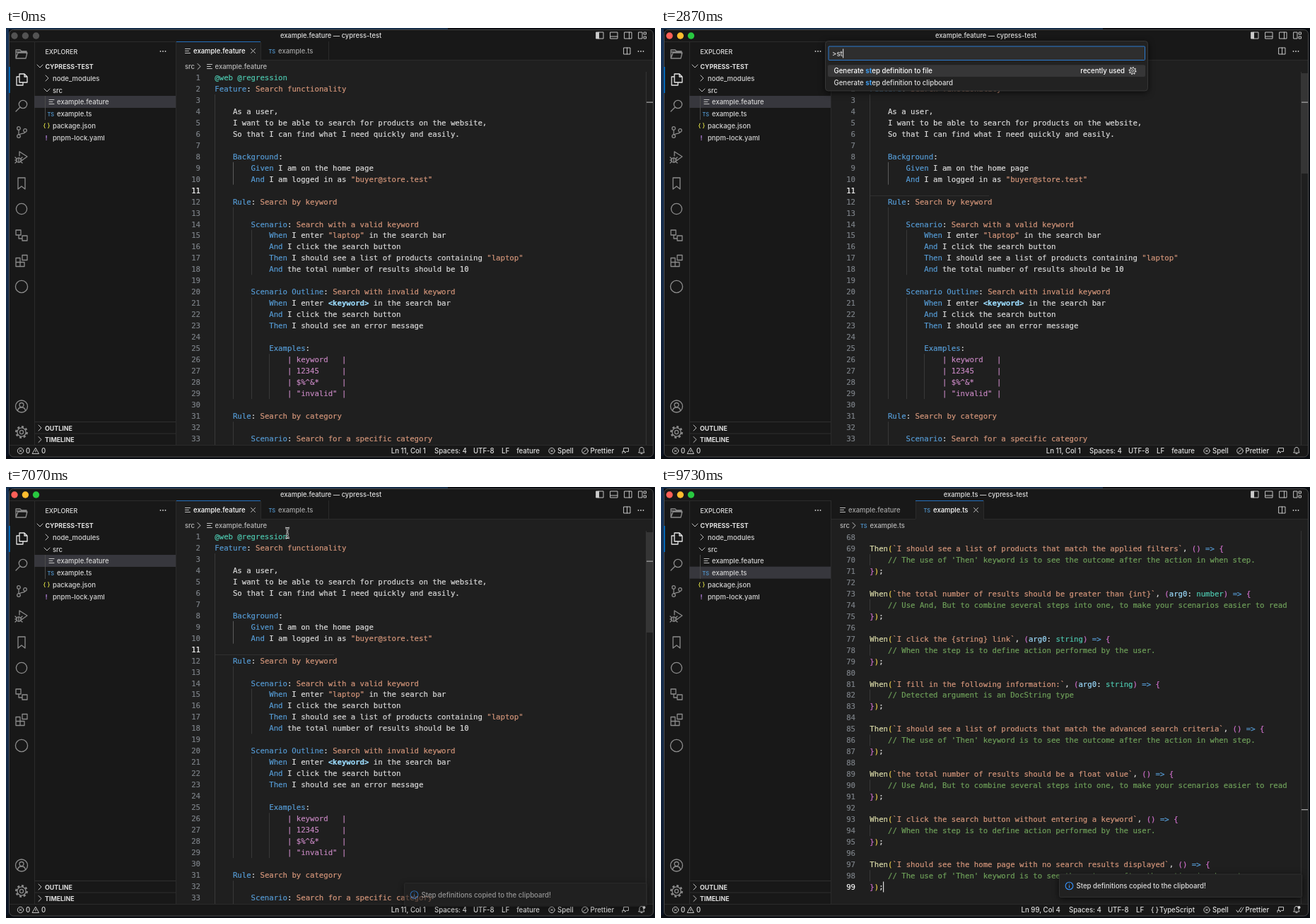
Recreate the animation shown at these times as an HTML page. Size 918x610 px, loop 9870 ms.

```html
<!DOCTYPE html>
<html lang="en">
<head>
<meta charset="utf-8">
<title>Step definitions</title>
<style>
html, body { margin: 0; width: 100%; height: 100%; overflow: hidden; background: #0a0d12; }
svg { display: block; width: 100vw; height: 100vh; }
text { font: 500 9.65px Inter, "Open Sans", sans-serif; color: #dedede; white-space: pre; }
text, tspan { fill: currentColor; }
.code { font: 10.66px "DejaVu Sans Mono", "Liberation Mono", monospace; color: #dcdcdc; }
.code, .code tspan { stroke: currentColor; stroke-width: .18; }
.num { color: #7d8288; text-anchor: end; }
.name { font-size: 9.5px; color: #d4d4d4; }
.title { font-size: 9.35px; text-anchor: middle; }
.plain { font-size: 8.9px; }
.head { font-size: 8.9px; font-weight: 700; }
.dim { color: #a4a4a4; }
.crumb { font-size: 9.5px; color: #b8b8b8; }
.lit { color: #fff; }
.hit { color: #3d9cf0; font-weight: 700; }
.end { text-anchor: end; }
.ts { color: #4e8fc4; font-size: 7.4px; font-weight: 600; }
.json { color: #cbcb41; font-size: 8.5px; font-weight: 600; }
.yaml { color: #a074c4; font-weight: 700; }
.key { font: bold 8.5px "DejaVu Sans", sans-serif; color: #eee; text-anchor: middle; }
.k { color: #569cd6; } .s { color: #d6977b; } .t { color: #4ec9b0; } .v { color: #9cdcfe; font-weight: 700; }
.p { color: #c586c0; } .c { color: #6fa05a; } .f { color: #dcdcaa; } .g { color: #f0d04a; }
.o { color: #d070cc; } .a { color: #9cdcfe; }
.ico { fill: none; stroke: #8c8c8c; stroke-width: 1.3; stroke-linejoin: round; stroke-linecap: round; }
.on { stroke: #e6e6e6; }
.small { stroke: #ccc; stroke-width: .95; }
.info { stroke: #3794ff; stroke-width: 1.1; }
.box { filter: drop-shadow(0 2px 5px #000a); }
</style>
</head>
<body>
<svg id="stage" viewBox="0 0 918 610" preserveAspectRatio="none" xml:space="preserve"></svg>
<script>
const LOOP = 9870, STEP = 70;
const LINE = 15.97, CHAR = 6.42, LEFT = 295.3, ROW = 16.72;
const FOCUS = 70, OPEN = 1610, TYPE = 2660, POINT = 5320, CLOSE = 6860, NOTE = 6945, SWITCH = 7910, PASTE = 9030;

const esc = s => s.replace(/&/g, '&amp;').replace(/</g, '&lt;');
const text = (x, y, s, cls = '', more = '') => `<text x="${x}" y="${y + 3.5}" class="${cls}" ${more}>${s}</text>`;
const rect = (x, y, w, h, fill, more = '') => `<rect x="${x}" y="${y}" width="${w}" height="${h}" fill="${fill}" ${more}/>`;
const path = (d, cls = '') => `<path d="${d}" class="ico ${cls}"/>`;
const ring = (x, y, r, cls = '') => `<circle cx="${x}" cy="${y}" r="${r}" class="ico ${cls}"/>`;
const group = (id, body, more = '') => `<g id="${id}" ${more}>${body}</g>`;
const at = (x, y, body) => `<g transform="translate(${x} ${y})">${body}</g>`;
const right = (x, y) => path(`M${x - 2} ${y - 4}l4 4l-4 4`, 'small');
const down = (x, y) => path(`M${x - 4} ${y - 2}l4 4l4 -4`, 'small');
const lines = (x, y) => path(`M${x - 3.5} ${y - 3}h7m-7 3h5m-5 3h7`, 'small');
const dots = (x, y) => [-3.5, 0, 3.5].map(d => `<circle cx="${x + d}" cy="${y}" r=".9" fill="#ccc"/>`).join('');
const gear = (x, y, r, cls = '') => ring(x, y, r * .72, cls) + ring(x, y, r * .3, cls) +
  `<circle cx="${x}" cy="${y}" r="${r * .9}" class="ico ${cls}" style="stroke-width:${r * .3};stroke-linecap:butt" pathLength="16" stroke-dasharray="1 1"/>`;

// Splits a line into coloured spans; the group name in the rule is the class.
function paint(line, rule) {
  let out = '', last = 0;
  for (const m of line.matchAll(rule)) {
    const cls = Object.keys(m.groups).find(k => m.groups[k] !== undefined);
    out += esc(line.slice(last, m.index)) + `<tspan class="${cls}">${esc(m[0])}</tspan>`;
    last = m.index + m[0].length;
  }
  return out + esc(line.slice(last));
}

function code(rows, first, y0, active, rule) {
  return rows.map((row, i) => {
    const y = y0 + i * LINE, n = first + i;
    return text(275, y + .4, n, 'code num' + (n === active ? ' lit' : '')) +
      (row ? text(LEFT, y + .4, paint(row, rule), 'code') : '');
  }).join('');
}

const guide = (col, from, to, y0 = 70, color = '#383838') =>
  rect(Math.round(LEFT + col * CHAR), y0 + (from - 1.5) * LINE, 1, (to - from + 1) * LINE, color);

const featureRule = /(?<t>^@.*)|(?<k>^\s*(?:Feature|Background|Rule|Scenario Outline|Scenario|Examples)(?=:)|^\s*(?:Given|When|Then|And)\b)|(?<p>\|.*)|(?<v><\w+>)|(?<s>"[^"]*"|(?<=: ).*)/g;
const feature = `@web @regression
Feature: Search functionality

    As a user,
    I want to be able to search for products on the website,
    So that I can find what I need quickly and easily.

    Background:
        Given I am on the home page
        And I am logged in as "buyer@store.test"

    Rule: Search by keyword

        Scenario: Search with a valid keyword
            When I enter "laptop" in the search bar
            And I click the search button
            Then I should see a list of products containing "laptop"
            And the total number of results should be 10

        Scenario Outline: Search with invalid keyword
            When I enter <keyword> in the search bar
            And I click the search button
            Then I should see an error message

            Examples:
                | keyword   |
                | 12345     |
                | $%^&*     |
                | "invalid" |

    Rule: Search by category

        Scenario: Search for a specific category`.split('\n');

const stepRule = /(?<c>\/\/.*)|(?<s>`[^`]*`)|(?<f>^\w+(?=\())|(?<g>(?<=^\w+)\(|(?<=^\})\))|(?<o>[(){}])|(?<k>=>)|(?<a>arg0)|(?<t>\b(?:number|string)\b)/g;
const notes = {
  then: "The use of 'Then' keyword is to see the outcome after the action in when step.",
  and: 'Use And, But to combine several steps into one, to make your scenarios easier to read',
  when: 'When the step is to define action performed by the user.',
  doc: 'Detected argument is an DocString type'
};
const steps = [
  ['then', 'I should see a list of products that match the applied filters'],
  ['and', 'the total number of results should be greater than {int}', 'number'],
  ['when', 'I click the {string} link', 'string'],
  ['doc', 'I fill in the following information:', 'string'],
  ['then', 'I should see a list of products that match the advanced search criteria'],
  ['and', 'the total number of results should be a float value'],
  ['when', 'I click the search button without entering a keyword'],
  ['then', 'I should see the home page with no search results displayed']
].flatMap(([kind, step, arg]) => ['',
  `${kind === 'then' ? 'Then' : 'When'}(\`${step}\`, (${arg ? 'arg0: ' + arg : ''}) => {`,
  '    // ' + notes[kind], '});']);

const commands = [
  ['Generate step definition to file'], ['Generate step definition to clipboard'],
  ['Developer: Reload Window'], ['Preferences: Open User Settings (JSON)'],
  ['Preferences: Open User Settings'], ['Format Document', '⇧⌘I'],
  ['View: Show Mordel Actions'], ['Transform to Uppercase'], ['Spell: Toggle Spell Checking'],
  ['Add Browser Breakpoint'], ['Add Cursor Above', '⌥⌘↑'], ['Add Cursor Below', '⌥⌘↓'],
  ['Add Cursors To Bottom'], ['Add Cursors to Line Ends', '⇧⌥I'], ['Add Cursors To Top']
].map(([name, keys = ''], i) => ({ name, keys, label: i < 9 ? 'recently used' : 'other commands' }));

const typed = [2660, 2870, 3360, 3500, 3640, 3920, 4270, 4480, 4620, 4900];
const QUERY = 'step defin';

function palette(query, hover) {
  const rule = new RegExp('\\b' + query, 'i');
  const rows = commands.filter(c => rule.test(c.name));
  const bottom = Math.min(295, 55.5 + rows.length * ROW);
  let out = rect(232.5, 18.5, 456, bottom - 18.5, '#222', 'rx="4" stroke="#363636" class="box"') +
    rect(237, 26, 447.5, 19.5, '#2e2e2e', 'stroke="#2a7ad0" rx="1"') +
    text(242, 36, '>' + query);
  rows.forEach((row, i) => {
    const y = 60.5 + i * ROW, hot = i === 0 || i === hover;
    const first = i === 0 || rows[i - 1].label !== row.label;
    if (hot) out += rect(236, y - 8.3, 449, ROW, i ? '#2b2b2c' : '#363637', 'rx="2"');
    if (first && i) out += rect(236, y - 8.3, 449, 1, '#3c3c3c');
    const name = query ? row.name.replace(rule, m => `<tspan class="hit">${m}</tspan>`) : row.name;
    out += text(244.5, y, name, i ? '' : 'lit');
    if (first) out += text(hot ? 656 : 674, y, row.label, 'end ' + (i ? 'dim' : 'lit'));
    if (hot) out += gear(667, y, 5.3, 'small');
    let x = hot ? 652.5 : 670.5;
    for (const key of [...row.keys].reverse()) {
      const w = key === 'I' ? 11 : /[↑↓]/.test(key) ? 15 : 16.5;
      out += rect(x - w, y - 7, w, 13.5, '#333', 'rx="2" stroke="#3f3f3f" stroke-width=".8"') +
        text(x - w / 2, y - .3, key, 'key');
      x -= w + 3;
    }
  });
  return out;
}

function frame() {
  const lights = [12, 27.4, 42.5].map(x => `<circle cx="${x}" cy="11" r="4.7"/>`).join('');
  const layout = [840, 860, 880, 900].map((x, i) => path(i === 3
    ? `M${x - 5} 6h5v9h-5zM${x + 2.5} 6h3v3h-3zm0 6h3v3h-3z`
    : `M${x - 5} 6h10v9h-10z` + ['m3.5 0v9', 'm0 6h10', 'm6.5 0v9'][i], 'small') +
    (i === 0 ? rect(x - 5, 6, 4, 9, '#ccc') : '')).join('');
  const icons = at(22, 37, path('M-8 6v-12h6l2 2h7v3M-8 6l3-8h13l-2 8zM-8-3h15')) +
    at(22, 73, path('M-3-8h7l4 4v8h-11zM4-8v4h4M-3-4h-4v12h9v-4', 'on')) +
    at(22, 110, ring(2, -2, 5.7) + path('M-2 2l-6 6')) +
    at(22, 147, ring(-4, -5, 2.3) + ring(-4, 6, 2.3) + ring(5, -2, 2.3) + path('M-4-2.7v6.4M5 .3c0 3-7 1-8 4')) +
    at(22, 183, path('M-3-2v-6l11 7l-7 5') + ring(-4, 4, 3.2) + path('M-4 1v6M-9 0l2 2M-9 4h2M-9 8l2-2M1 0l-2 2M1 4h-2M1 8l-2-2')) +
    at(22, 220, path('M-5-8h10v16l-5-4l-5 4z')) + ring(22, 256, 7.6) +
    at(22, 293, path('M-8-7h7v7h-7zM1 1h7v7h-7zM-4 0v5h5')) +
    at(22, 329.5, path('M-8-4h6v6h6v6h-12zM-8 2h6v6M1-8h7v7h-7z')) + ring(22, 366, 8.6) +
    at(22, 535.5, ring(0, 0, 8.5) + ring(0, -2, 3) + path('M-5.5 6c1-6 10-6 11 0')) + gear(22, 572, 8.5);
  const tree = text(55.5, 33, 'EXPLORER', 'plain') + dots(222, 33) +
    down(48, 54) + text(55.5, 54, 'CYPRESS-TEST', 'head') +
    right(58, 71) + text(66, 71, 'node_modules', 'name') + down(58, 88) + text(66, 88, 'src', 'name') +
    group('pick', rect(40, 96, 200, 17, '#37373d')) + rect(55, 96, 1, 34, '#4a4a4a') +
    lines(64.5, 104.5) + text(72, 104.5, 'example.feature', 'name') +
    text(58.5, 121, 'TS', 'ts') + text(72, 121.3, 'example.ts', 'name') +
    text(52.5, 137.5, '{ }', 'json') + text(66, 138, 'package.json', 'name') +
    text(55.5, 155, '!', 'yaml') + text(66, 155, 'pnpm-lock.yaml', 'name') +
    rect(40, 557, 200, 1, '#2f2f2f') + right(48, 566) + text(55, 566, 'OUTLINE', 'head') +
    rect(40, 573.5, 200, 1, '#2f2f2f') + right(48, 582.5) + text(55, 582.5, 'TIMELINE', 'head');
  const status = ring(20.5, 598.5, 4.2, 'small') + path('M19 597l3 3m0-3l-3 3', 'small') + text(28, 598.5, '0') +
    path('M42 594.5l4.5 8h-9zM42 597.5v2.5', 'small') + text(50, 598.5, '0') +
    ring(772, 598.5, 4.2, 'small') + path('M770.5 597l3 3m0-3l-3 3', 'small') + text(780, 598.5, 'Spell') +
    text(826.5, 598.5, 'Prettier') + path('M872 602v-3h2M874 594.5h6.5v5h-3l-2 2v-2h-1.5z', 'small') +
    path('M895 601h8l-1-2v-2.5c0-4-6-4-6 0v2.5zM898 602.5h2', 'small');
  const note = rect(563.5, 548, 343, 32.5, '#212121', 'rx="2" stroke="#303030" class="box"') +
    ring(577.5, 564.5, 5.3, 'info') + path('M577.5 564v3M577.5 561.7v.1', 'info') +
    text(587.5, 564.7, 'Step definitions copied to the clipboard!');
  const beam = 'M-3-7q3 0 3 2q0-2 3-2M0-5v10M-3 7q3 0 3-2q0 2 3 2M-2 2h4';
  const mouse = `<g id="beam" fill="none"><path d="${beam}" stroke="#eee" stroke-width="2.4"/><path d="${beam}" stroke="#111" stroke-width=".9"/></g>` +
    '<path id="hand" fill="#fff" stroke="#111" stroke-width=".9" d="M-2-5.5q1.2-1 2 .3v3l4.5 1q1.3.5 1 2.2l-1 4.5h-5.5l-3.8-5q0-1.4 1.3-1l1.5 1z"/>';

  return '<defs><linearGradient id="desk" x2="0" y2="1"><stop stop-color="#183357"/><stop offset=".6" stop-color="#152b49"/><stop offset="1" stop-color="#0a1220"/></linearGradient>' +
    '<clipPath id="clip"><rect x="241" y="62" width="674" height="528"/></clipPath>' +
    '<clipPath id="drop"><rect x="220" y="10" width="480" height="284.5"/></clipPath></defs>' +
    rect(0, 0, 918, 610, '#0a0d12') + rect(0, 0, 4, 606, 'url(#desk)') + rect(0, 0, 625, 2, '#152d48') +
    rect(4.5, 2.5, 911, 604.5, '#181818', 'rx="6" stroke="#484848"') +
    rect(5, 19, 910, 1, '#2b2b2b') + group('lights', lights) + text(459.5, 10.7, '', 'title', 'id="title"') + layout +
    rect(40, 19, 1, 571, '#2b2b2b') + rect(4, 55, 1.6, 37, '#0078d4') + icons + tree +
    rect(240, 19, 675, 571, '#1f1f1f') + rect(240, 19, 675, 26, '#181818') + rect(240, 45, 675, 1, '#2b2b2b') +
    group('tabs', '') + rect(240, 19, 1, 571, '#2b2b2b') +
    path('M874 28h9v9h-9zM878.5 28v9', 'small') + dots(898, 33) +
    text(253, 54.5, 'src', 'crumb') + right(273, 54.5) + group('crumb', '') +
    group('editor', '', 'clip-path="url(#clip)"') + rect(905, 62, 1, 528, '#343434') + group('ruler', '') +
    rect(5, 590, 910, 1, '#2b2b2b') + status + group('state', '') +
    '<rect id="caret" width="1.2" height="15" fill="#ddd"/>' + group('note', note) +
    group('list', '', 'clip-path="url(#drop)"') + '<rect id="entry" y="29.5" width="1" height="13" fill="#eee"/>' +
    group('mouse', mouse);
}

function tabs(ts) {
  const x = ts ? 360 : 240, w = ts ? 96 : 120, cx = ts ? 445.5 : 349.5;
  return rect(x, 19, w, 27, '#1f1f1f') + rect(x, 19, w, 1, '#2570bd') +
    rect(360, 20, 1, 25, '#2b2b2b') + rect(456, 19, 1, 26, '#2b2b2b') +
    lines(257, 32.5) + text(265, 32.5, 'example.feature', 'name ' + (ts ? 'dim' : 'lit')) +
    text(371.5, 32.3, 'TS', 'ts') + text(385, 32.5, 'example.ts', 'name ' + (ts ? 'lit' : 'dim')) +
    path(`M${cx - 3} 29.5l6 6m0-6l-6 6`, 'small');
}

function state(ts, ln, ok) {
  const shift = ts ? -29 : 0;
  return text(593.8 + shift, 598.5, ln, 'end') + text(606 + shift, 598.5, 'Spaces: 4') +
    text(661 + shift, 598.5, 'UTF-8') + text(701 + shift, 598.5, 'LF') +
    (ts ? text(693, 598.2, '{ }') : '') + text(755, 598.5, ts ? 'TypeScript' : 'feature', 'end') +
    (ts ? path('M814 599l2 3l5-7M818.5 600l1.5 2l4-7', 'small')
      : ring(819, 598.5, 4.3, 'small') + path('M816 601.5l6-6', 'small')) +
    (ok ? '<circle cx="902.5" cy="595" r="2" fill="#ddd"/>' : '');
}

function editor(mode, focus) {
  if (mode === 1) return text(275, 70.4, '1', 'code num lit');
  if (mode === 2) return steps.map((s, i) => i % 4 === 2 ? guide(0, i + 1, i + 1, 71) : '').join('') +
    code(steps, 68, 71, 99, stepRule);
  return guide(0, 3, 34) + guide(4, 9, 10, 70, '#5a5a5a') + guide(4, 13, 29) + guide(4, 32, 34) +
    guide(8, 15, 18) + guide(8, 21, 29) + guide(12, 26, 29) +
    (focus ? rect(296, 237, 168, 1, '#303030') : '') + code(feature, 1, 70, 11, featureRule);
}

const track = [
  [FOCUS, 340, 229], [POINT - 1, 340, 229], [POINT, 348, 197], [5810, 348, 197], [6400, 398, 78],
  [6950, 398, 78], [7070, 398, 65], [7400, 412, 34], [SWITCH, 412, 34], [8190, 443, 162], [LOOP, 443, 162]
];
function mouseAt(t) {
  const i = Math.max(1, track.findIndex(k => k[0] >= t));
  const [a, b] = [track[i - 1], track[i]];
  const p = Math.min(1, Math.max(0, (t - a[0]) / (b[0] - a[0]))), e = p * p * (3 - 2 * p);
  return [a[1] + (b[1] - a[1]) * e, a[2] + (b[2] - a[2]) * e];
}

const stage = document.getElementById('stage');
stage.innerHTML = frame();
const $ = id => document.getElementById(id);
const show = (id, on) => { $(id).style.display = on ? '' : 'none'; };
const blink = (t, phase) => (((t - phase) % 1000) + 1000) % 1000 < 500;
const measure = document.createElement('canvas').getContext('2d');
measure.font = '500 9.65px Inter, "Open Sans", sans-serif';
let docKey = '', listKey = '';

function draw(t) {
  const focus = t >= FOCUS, open = t >= OPEN && t < CLOSE, ts = t >= SWITCH;
  const mode = t >= PASTE ? 2 : ts ? 1 : 0;

  const key = [mode, focus, t >= CLOSE].join();
  if (key !== docKey) {
    docKey = key;
    const name = ts ? 'example.ts' : 'example.feature';
    $('title').textContent = name + ' — cypress-test';
    $('pick').setAttribute('transform', `translate(0 ${ts ? 16.7 : 0})`);
    $('tabs').innerHTML = tabs(ts);
    $('crumb').innerHTML = (ts ? text(282, 54.3, 'TS', 'ts') : lines(288, 54.5)) + text(295.5, 54.5, name, 'crumb');
    $('editor').innerHTML = editor(mode, focus);
    $('ruler').innerHTML = (!ts && focus ? rect(906, 64, 9, 142, '#353535') : '') +
      (mode === 1 ? '' : rect(906, ts ? 456 : 104.5, 9, 1.3, '#a0a0a0'));
    $('state').innerHTML = state(ts, ['Ln 11, Col 1', 'Ln 1, Col 1', 'Ln 99, Col 4'][mode], t >= CLOSE);
    [...$('lights').children].forEach((c, i) => c.setAttribute('fill', focus ? ['#ff5f57', '#febc2e', '#28c840'][i] : '#535353'));
  }

  const [x, y] = mouseAt(t);
  const mouse = focus && t < TYPE || t >= POINT && t < PASTE;
  const count = typed.filter(k => k <= t).length, query = QUERY.slice(0, count);
  const hover = mouse && y > 52 ? Math.floor((y - 52.1) / ROW) : -1;
  show('list', open);
  if (open && listKey !== query + hover) {
    listKey = query + hover;
    $('list').innerHTML = palette(query, hover);
  }
  const last = count ? typed[count - 1] : OPEN;
  show('entry', open && blink(t, last - 90));
  $('entry').setAttribute('x', 242.3 + measure.measureText('>' + query).width);

  const phase = t < OPEN ? 830 : t < SWITCH ? 7360 : t < PASTE ? SWITCH : 8730;
  show('caret', focus && !open && blink(t, phase));
  $('caret').setAttribute('x', mode === 2 ? 314 : 295.5);
  $('caret').setAttribute('y', [222.5, 63, 558.5][mode]);

  const p = Math.min(1, Math.max(0, (t - NOTE) / 300)), e = 1 - (1 - p) ** 1.8;
  $('note').setAttribute('transform', `translate(0 ${33 * (1 - e)})`);
  $('note').setAttribute('opacity', e);

  show('mouse', mouse);
  const onList = open && x > 232 && y < (count ? 89 : 295);
  show('hand', onList || y < 46);
  show('beam', !onList && y >= 46);
  $('mouse').setAttribute('transform', `translate(${x} ${y})`);
}

function tick(now) {
  draw(Math.floor(now % LOOP / STEP) * STEP);
  requestAnimationFrame(tick);
}
draw(0);
requestAnimationFrame(tick);
</script>
</body>
</html>
```
